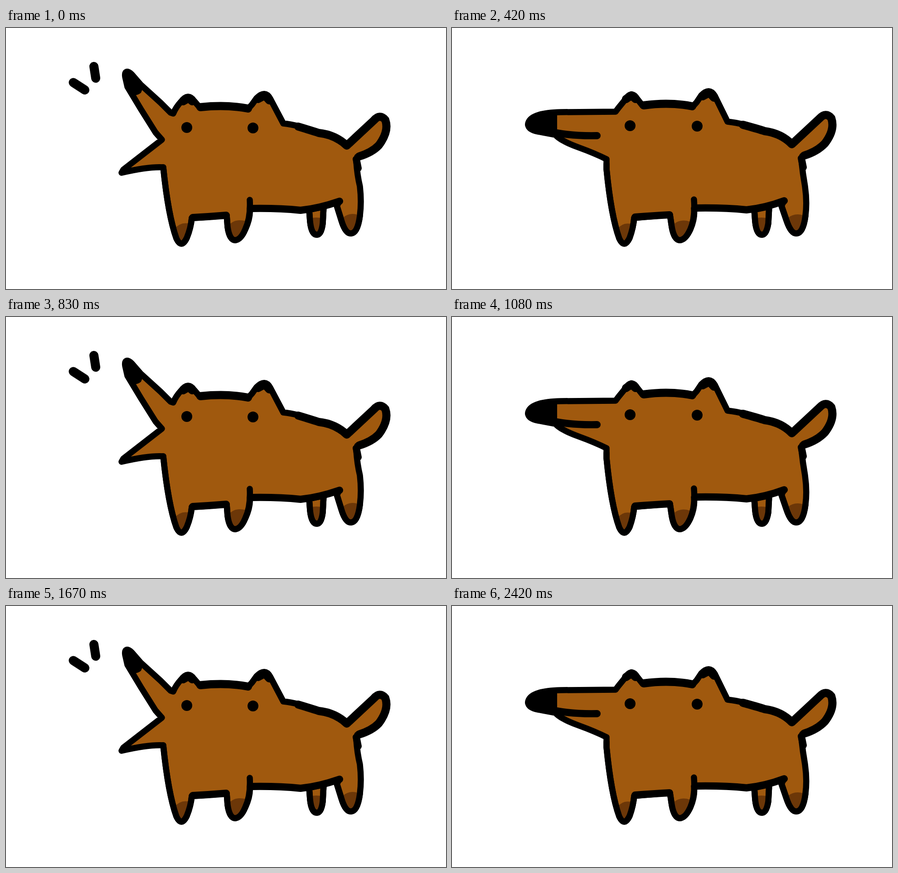
These frames come from a looping animation (971x577 px, 2510 ms). An HTML page:

```html
<!DOCTYPE html>
<html lang="en">
<head>
<meta charset="utf-8">
<title>Barking dog</title>
<style>
  html, body { margin: 0; height: 100%; overflow: hidden; background: #fff; }
  svg { display: block; width: 100%; height: 100%; }
  path { fill: none; stroke: #000; stroke-width: 16; stroke-linecap: round; stroke-linejoin: round; }
  .body { fill: #a0590e; stroke-width: 13.5; }
  .paws { fill: #6c3708; stroke: none; }
  .line { stroke-width: 13.5; }
  .thick { stroke-width: 18; }
  .marks { stroke-width: 20; }
  .nose { fill: #000; stroke: none; }
</style>
</head>
<body>
<svg viewBox="0 0 971 577">
  <g id="open">
    <path class="body" d="M669 402L671 428Q674 457 686 457Q696 457 699 432L701 395Z"/>
    <path class="paws" d="M670 421Q684 417 700 421L694 456H678Z"/>
    <path class="line" d="M669 402L671 428Q674 457 686 457Q696 457 699 432L701 395"/>
    <path class="body" d="M263 108C261 95 268 93 277 102L297 125 341 165 363 187 369 189Q375 175 386 163Q402 142 415 161L427 175Q487 167 535 178L543 169 553 155Q572 136 583 156L612 211Q645 214 690 232Q727 235 752 260L812 204Q825 190 836 202Q847 228 823 259Q808 276 775 285L773 295Q775 325 781 350Q785 385 781 415Q776 454 761 454Q749 455 740 425L730 393 736 383Q690 399 650 403Q600 398 538 399Q540 420 528 445Q518 469 505 469Q493 468 489 440L487 414Q450 418 410 420Q408 442 399 464Q387 489 376 465Q358 415 347 308Q315 306 255 320L259 313 344 247 330 231 298 180 268 130Z"/>
    <path class="paws" d="M371 445Q384 429 402 432Q398 462 388 472Q379 473 371 445Z
      M494 434Q506 421 530 427Q520 460 506 464Q497 460 494 434Z
      M743 420Q757 407 777 413Q774 446 761 448Q751 448 743 420Z"/>
    <path class="line" d="M347 308Q358 415 376 465Q387 489 399 464Q408 442 410 420M487 414L489 440Q493 468 505 469Q518 469 528 445Q540 420 538 380M730 393L740 425Q749 455 761 454Q776 454 781 415"/>
    <path d="M736 383Q690 399 650 403Q600 398 541 399M412 419Q450 417 486 414M773 290L777 310"/>
    <path class="thick" d="M429 175Q487 169 534 178M556 157L571 149 581 160M391 162L403 155 411 162M645 218Q675 227 690 232Q727 236 752 260L812 204Q825 189 837 203Q846 228 823 259Q808 275 779 284"/>
    <path class="nose" d="M258 104L276 97 304 128 298 143Q293 148 283 149L260 116Z"/>
    <path class="marks" d="M194 85L198 111M148.500 120.500L174 137"/>
    <circle cx="399" cy="220" r="12"/><circle cx="545" cy="221" r="12"/>
  </g>
  <g id="shut">
    <path class="body" d="M667 402L669 428Q672 457 684 457Q694 457 698 432L700 395Z"/>
    <path class="paws" d="M668 421Q682 417 698 421L692 456H676Z"/>
    <path class="line" d="M667 402L669 428Q672 457 684 457Q694 457 698 432L700 395"/>
    <path class="body" d="M168 214C169 192 205 187 240 186L361 185 367 177 380 161Q396 135 409 157L420 171Q480 163 531 174L540 164 550 149Q568 130 580 150L608 207Q645 211 690 228Q727 232 750 257L811 200Q825 186 836 198Q847 225 823 255Q806 274 773 283L771 292Q774 322 779 350Q784 385 780 415Q775 454 760 454Q748 455 738 425L727 393 733 382Q690 398 650 402Q600 397 534 398Q537 420 526 445Q515 469 502 469Q490 468 485 440L481 413Q445 416 402 420Q400 442 392 464Q380 489 369 465Q351 415 341 312L341 290Q315 277 282 265Q240 250 228 236L196 230Q170 227 168 214Z"/>
    <path class="paws" d="M364 445Q377 429 394 433Q391 462 381 472Q372 473 364 445Z
      M489 434Q504 421 525 428Q516 460 502 464Q492 460 489 434Z
      M740 421Q755 408 775 414Q772 446 760 448Q750 448 740 421Z"/>
    <path class="line" d="M341 300L341 312Q351 415 369 465Q380 489 392 464Q400 442 402 420M481 413L485 440Q490 468 502 469Q515 469 526 445Q537 420 534 379M727 393L738 425Q748 455 760 454Q775 454 780 415"/>
    <path d="M232 232Q270 239 320 238M733 382Q690 398 650 402Q600 397 539 398M404 418Q445 415 480 413M771 288L775 308"/>
    <path class="thick" d="M423 171Q480 163 530 173M553 151L568 143 578 154M384 157L396 149 405 157M642 214Q675 223 690 228Q727 233 750 257L811 200Q825 185 837 199Q846 225 823 255Q806 273 777 282"/>
    <path class="nose" d="M161 214C162 188 200 182 232 181V236Q215 240 190 235Q163 231 161 214Z"/>
    <circle cx="393" cy="216" r="12"/><circle cx="541" cy="217" r="12"/>
  </g>
</svg>
<script>
  const open = document.getElementById('open'), shut = document.getElementById('shut');
  const LOOP = 2510;
  let start;

  // Twelve poses a second, each start rounded to 10 ms
  function draw(now) {
    start ??= now;
    const tick = Math.floor((now - start) % LOOP / 10);
    const pose = Math.min(29, Math.floor((tick + 0.4) * 0.12)) % 2;
    open.style.display = pose ? 'none' : '';
    shut.style.display = pose ? '' : 'none';
    requestAnimationFrame(draw);
  }
  draw(performance.now());
</script>
</body>
</html>
```
